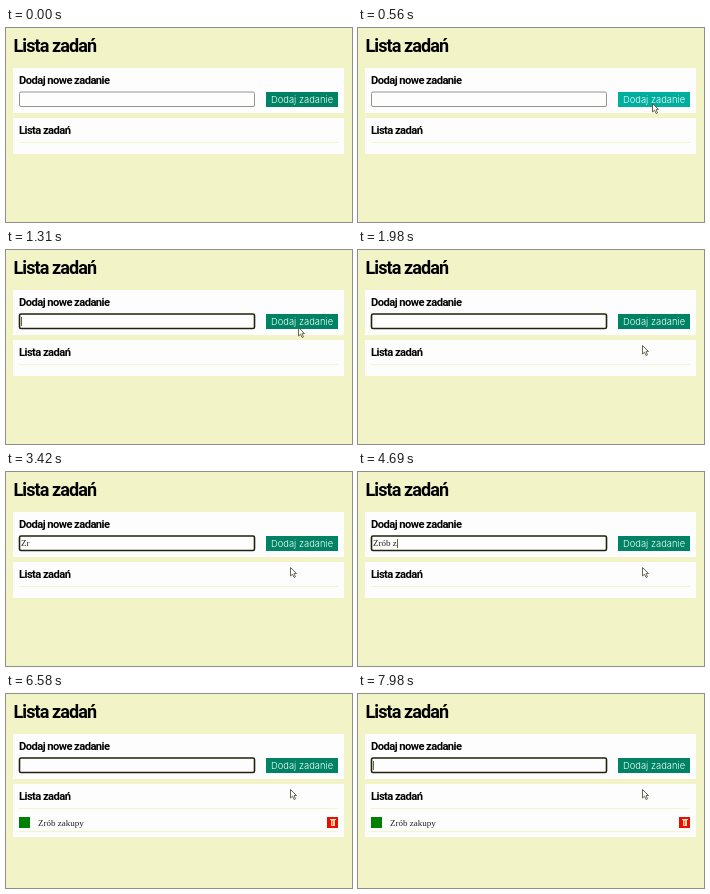
An HTML page with a canvas for the animation above (8 s loop, 346x194 px).

```html
<!DOCTYPE html>
<html lang="pl">
<head>
<meta charset="utf-8">
<title>Lista zadań</title>
<style>
html, body { margin: 0; width: 100%; height: 100%; overflow: hidden; background: #f3f3c8; }
canvas { display: block; width: 346px; height: 194px; }
</style>
</head>
<body>
<canvas id="stage"></canvas>
<script>
const W = 346, H = 194, LOOP = 8000;
const canvas = document.getElementById("stage");
const ctx = canvas.getContext("2d");
const ratio = window.devicePixelRatio || 1;
canvas.width = W * ratio;
canvas.height = H * ratio;

const SERIF = '9px "Liberation Serif", serif';
const PAGE = "#f3f3c8", PANEL = "#fdfdfd";

const TASK = "Zrób zakupy";
const KEYS = [2440, 2920, 3560, 3960, 4300, 4690, 4840, 4980, 5290, 5580, 5840];
const FOCUS = 990, SUBMIT = 6430, BLINK = 510;

// Pointer rests and the two moves between them
const ENTRY = [329, 111], ON_BUTTON = [294, 75], PRESSED = [292, 77], REST = [284, 95];

const clamp = v => Math.min(1, Math.max(0, v));
const ramp = (t, a, b) => clamp((t - a) / (b - a));
const mix = (a, b, k) => a + (b - a) * k;
const between = (p, q, k) => [mix(p[0], q[0], k), mix(p[1], q[1], k)];
const easeOut = k => 1 - (1 - k) ** 2;
const easeInOut = k => k * k * (3 - 2 * k);

function box(x, y, w, h, color) {
  ctx.fillStyle = color;
  ctx.fillRect(x, y, w, h);
}

function text(str, x, y, font, color = "#000") {
  ctx.font = font;
  ctx.fillStyle = color;
  ctx.fillText(str, x, y);
}

function heading(str, x, y, size) {
  ctx.letterSpacing = "-0.05em";
  ctx.font = `bold ${size}px "Roboto", sans-serif`;
  ctx.letterSpacing = `${-0.05 * size}px`;
  ctx.fillStyle = "#000";
  ctx.fillText(str, x, y);
  ctx.letterSpacing = "0px";
}

function rule(y) {
  box(13, y, 319, 1, "#f5f5cd");
}

function pointerAt(t) {
  if (t < 20) return null;
  if (t < 960) return between(ENTRY, ON_BUTTON, easeOut(ramp(t, 20, 600)));
  if (t < 1310) return between(ON_BUTTON, PRESSED, ramp(t, 960, 1310));
  return between(PRESSED, REST, easeInOut(ramp(t, 1310, 1560)));
}

function drawPointer(x, y) {
  ctx.save();
  ctx.translate(Math.round(x) + 0.5, Math.round(y) + 0.5);
  ctx.beginPath();
  [[0, 0], [0, 8.5], [2, 6.7], [3.6, 10], [5, 9.3], [3.5, 6.2], [6, 6]]
    .forEach(p => ctx.lineTo(...p));
  ctx.closePath();
  ctx.fillStyle = "#fff";
  ctx.fill();
  ctx.strokeStyle = "#55553c";
  ctx.lineWidth = 0.9;
  ctx.stroke();
  ctx.restore();
}

function caretShown(t, typed) {
  if (t >= SUBMIT) return Math.floor((t - SUBMIT) / BLINK) % 2 === 1;
  const since = typed.length ? typed[typed.length - 1] : FOCUS;
  return Math.floor((t - since) / 500) % 2 === 0;
}

function drawInput(t) {
  const focused = t >= FOCUS;
  ctx.beginPath();
  ctx.roundRect(13.5, 64, 235, 14.5, 1.5);
  ctx.fillStyle = PANEL;
  ctx.fill();
  ctx.lineWidth = focused ? 1.6 : 1;
  ctx.strokeStyle = focused ? "#222210" : "#94948c";
  ctx.stroke();
  if (!focused) return;

  const typed = t < SUBMIT ? KEYS.filter(k => k <= t) : [];
  const value = TASK.slice(0, typed.length);
  text(value, 15, 74, SERIF, "#222");
  if (caretShown(t, typed)) {
    const x = 15 + ctx.measureText(value).width;
    box(Math.round(x), 67, 1, 9, "#66663a");
  }
}

function drawButton(t) {
  const hover = ramp(t, 300, 560) * (1 - ramp(t, 980, 1280));
  const green = Math.round(mix(130, 174, hover));
  const blue = Math.round(mix(100, 160, hover));
  box(260, 64, 72, 15, `rgb(0,${green},${blue})`);
  text("Dodaj zadanie", 265, 74.5, '300 9.4px "Inter", sans-serif', "#f4fff8");
}

function drawItem() {
  box(13, 123, 11, 11, "#008000");
  text(TASK, 32, 131.5, SERIF, "#222");
  box(321, 123, 11, 11, "#f00b00");
  box(325, 126, 4, 6, "#ffd9a0");
  box(324, 125, 6, 1, "#ffe9c0");
  box(326, 127, 1, 4, "#f07040");
  rule(137);
}

function draw(t) {
  ctx.setTransform(ratio, 0, 0, ratio, 0, 0);
  const added = t >= SUBMIT;
  box(0, 0, W, H, PAGE);
  heading("Lista zadań", 7.5, 24, 18);
  box(7, 40, 331, 45, PANEL);
  box(7, 90, 331, added ? 53 : 36, PANEL);
  heading("Dodaj nowe zadanie", 13, 55.5, 11.2);
  heading("Lista zadań", 13, 106, 11.2);
  rule(114);
  drawInput(t);
  drawButton(t);
  if (added) drawItem();
  const pointer = pointerAt(t);
  if (pointer) drawPointer(...pointer);
}

const start = performance.now();
function frame() {
  draw((performance.now() - start) % LOOP);
  requestAnimationFrame(frame);
}
frame();
</script>
</body>
</html>
```
